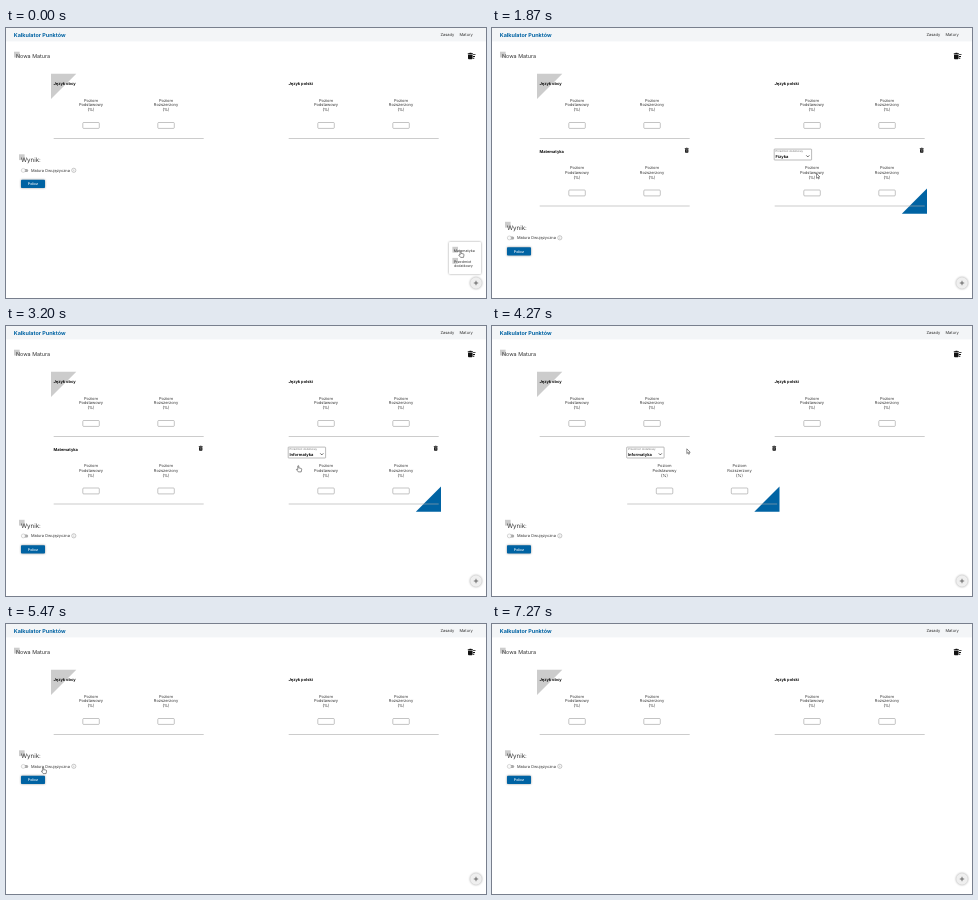
These frames come from a looping animation (480x270 px, 8.07 s). An HTML page:

```html
<!DOCTYPE html>
<html lang="pl">
<head>
<meta charset="utf-8">
<title>Kalkulator Punktów</title>
<style>
  html, body { margin: 0; width: 100%; height: 100%; overflow: hidden; background: #fff; }
  svg { display: block; width: 100vw; height: 100vh; }
  text { font: 4px Inter, "Open Sans", sans-serif; fill: #333; text-rendering: geometricPrecision; }
  .bold { font-weight: 700; fill: #111; }
  .mid { text-anchor: middle; }
  .deco { fill: #ccc; }
  .shadow { filter: drop-shadow(0 .6px 1px rgba(0, 0, 0, .4)); }
</style>
</head>
<body>
<svg id="stage" viewBox="0 0 480 270" preserveAspectRatio="none"></svg>
<script>
const LOOP = 8070, TICK = 1000 / 15;
const ROW = 67.5, COLUMN = 235, BLUE = '#0063a3';
const SUBJECTS = ['Fizyka', 'Informatyka', 'Chemia', 'Biologia', 'Geografia', 'Historia', 'WOS'];

const text = (x, y, label, cls = '', style = '') =>
  `<text x="${x}" y="${y}" class="${cls}" style="${style}">${label}</text>`;
const rect = (x, y, w, h, attrs) => `<rect x="${x}" y="${y}" width="${w}" height="${h}" ${attrs}/>`;
const group = (id, body, attrs = '') => `<g id="${id}" ${attrs}>${body}</g>`;
const deco = (x, y) => rect(x, y, 5.6, 5.8, 'class="deco"');

// Cards are drawn at the top left slot and moved into place.
function level(x, name, id) {
  return text(x, 73.5, 'Poziom', 'mid') + text(x, 78.4, name, 'mid') + text(x, 83.1, '(%)', 'mid') +
    rect(x - 8.2, 94.5, 16.5, 5.9, `id="${id}" rx=".9" fill="#fff" stroke="#888" stroke-width=".5"`);
}

function card(id, head) {
  return group(id, head +
    level(85, 'Podstawowy', id + 'Basic') + level(160, 'Rozszerzony', id + 'Extended') +
    '<path d="M47.7 110.5H197.7" stroke="#aaa" stroke-width=".6"/>');
}

const title = label => text(47.5, 57, label, 'bold');
const bin = '<path d="M192.8 52.6h1l.4-.4h1l.4.4h1v.7h-3.8zM193 53.7h3.4v2.8q0 .7-.7.7h-2q-.7 0-.7-.7z" fill="#111"/>' +
  '<path d="M194 54.7l1.4 1.5M195.4 54.7l-1.4 1.5" stroke="#fff" stroke-width=".35"/>';

const select = rect(47.2, 53.6, 37.4, 10.9, 'rx=".5" fill="#fff" stroke="#777" stroke-width=".5"') +
  text(48.5, 56.8, 'Przedmiot dodatkowy', '', 'font-size:2.7px;fill:#777') +
  '<text id="chosen" x="48.5" y="62" class="bold"></text>' +
  '<path d="M79.3 59.9l1.5 1.5 1.5-1.5" fill="none" stroke="#222" stroke-width=".7"/>';

const dropdown = rect(281, 133.5, 42, 40.5, 'rx="1" fill="#fff" class="shadow"') +
  rect(281, 134.5, 42, 5.5, 'fill="#e3edf5"') +
  SUBJECTS.map((name, i) => text(283.5, 138.7 + i * 5.5, name)).join('');

const menu = rect(443, 214, 32, 32, 'rx=".8" fill="#fff" class="shadow"') +
  deco(446.4, 218.8) + deco(446.4, 229.9) +
  text(447.8, 224, 'Matematyka', '', 'font-size:3.6px') +
  text(448, 234.7, 'Przedmiot', '', 'font-size:3.6px') +
  text(448, 239, 'dodatkowy', '', 'font-size:3.6px');

const result = deco(13, 126.3) + text(15, 134.2, 'Wynik:', '', 'font-size:6.2px') +
  rect(15.6, 140.9, 6.6, 3, 'id="track" rx="1.5"') +
  '<circle id="thumb" cy="142.4" r="2" stroke="#aaa" stroke-width=".4"/>' +
  text(25, 143.9, 'Matura Dwujęzyczna', '', 'font-size:3.93px') +
  '<circle cx="67.8" cy="142.3" r="2.1" fill="none" stroke="#777" stroke-width=".4"/>' +
  '<path d="M67.8 141.9v1.4M67.8 141v.4" stroke="#777" stroke-width=".4"/>' +
  rect(15, 151.7, 24, 8.3, `rx=".8" fill="${BLUE}" class="shadow"`) +
  text(27, 157.1, 'Policz', 'mid', 'font-size:3.6px;font-weight:500;fill:#fff');

const sweepIcon = '<path d="M461.8 25.3h1.4l.5-.5h1.5l.5.5h1.2v.9h-5.1zM462 26.7h4.6v3.6q0 .9-.9.9h-2.8q-.9 0-.9-.9z' +
  'M467 26.2h2.5v.9H467zM467 28h2v.9h-2zM467 29.8h1.3v.9H467z" fill="#111"/>';

const arrow = '<path d="M0 0V4.8L1.1 3.8 1.9 5.5 2.7 5.1 1.9 3.5H3.4Z" fill="#fff" stroke="#222" stroke-width=".5"/>';
const hand = '<path d="M-.5.4Q0-.3.5.4V2.4L2.8 2.9Q3.5 3.1 3.4 3.9L2.9 6.4H0L-1.9 4Q-1.5 3.2-.5 4Z" ' +
  'fill="#fff" stroke="#222" stroke-width=".5"/>';

document.getElementById('stage').innerHTML =
  rect(0, 0, 480, 13.4, 'fill="#f3f5f7"') +
  text(7.8, 8.9, 'Kalkulator Punktów', 'bold', `font-size:5.45px;fill:${BLUE}`) +
  text(434.5, 8.3, 'Zasady') + text(453.5, 8.3, 'Matury') +
  deco(8, 23.7) + text(10, 30.2, 'Nowa Matura', '', 'font-size:5.4px') + sweepIcon +
  '<path d="M45 45.7h25.3L45 71z" class="deco"/>' +
  card('foreign', title('Język obcy')) +
  card('polish', title('Język polski')) +
  card('maths', title('Matematyka') + bin) +
  card('extra', select + bin + `<path d="M200 93v25.2h-25.2z" fill="${BLUE}"/>`) +
  group('result', result) + group('dropdown', dropdown) + group('menu', menu) +
  '<circle cx="470" cy="255" r="5.8" fill="#efefef" class="shadow"/>' +
  '<path d="M467.8 255h4.4M470 252.8v4.4" stroke="#222" stroke-width=".6"/>' +
  group('arrow', arrow) + group('hand', hand);

const el = Object.fromEntries([...document.querySelectorAll('[id]')].map(node => [node.id, node]));
const show = (node, on) => node.setAttribute('display', on ? 'inline' : 'none');
const move = (node, x, y) => node.setAttribute('transform', `translate(${x} ${y})`);
const ramp = (t, from, to) => Math.min(1, Math.max(0, (t - from) / (to - from)));
const ease = p => p * p * (3 - 2 * p);
const within = (t, from, to) => t >= from && t < to;

// time, x, y of the pointer tip
const PATH = [
  [0, 454.6, 223], [130, 454.6, 223], [400, 470, 254], [470, 470, 254], [730, 465.2, 239.5],
  [1070, 465.2, 239.5], [1730, 324.5, 145.5], [1870, 324.5, 145.5], [2070, 302, 127],
  [2330, 302, 127], [2730, 292.3, 139.5], [3200, 292.3, 139.5], [3860, 194.8, 122.8],
  [4270, 194.8, 122.8], [4530, 281.5, 122.8], [4600, 281.5, 122.8], [4930, 85, 157],
  [5460, 37.2, 143.2], [6800, 37.2, 143.2], [7200, 331, 170]
];
const HAND_SPANS = [[0, 200], [330, 1140], [2000, 3270], [3730, 4130], [4460, 4670], [5260, 6870]];

function pointer(t) {
  const next = PATH.findIndex(key => key[0] > t);
  if (next < 0) return PATH.at(-1).slice(1);
  const [t0, x0, y0] = PATH[next - 1], [t1, x1, y1] = PATH[next];
  const p = ease(ramp(t, t0, t1));
  return [x0 + (x1 - x0) * p, y0 + (y1 - y0) * p];
}

function draw(t) {
  const maths = within(t, 260, 4130), extra = within(t, 1190, 4660);
  show(el.maths, maths);
  show(el.extra, extra);
  move(el.polish, COLUMN, 0);
  move(el.maths, 0, ROW);
  move(el.extra, maths ? COLUMN : 87.5, ROW);
  move(el.result, 0, maths || extra ? ROW : 0);
  el.chosen.textContent = SUBJECTS[t < 2930 ? 0 : 1];

  const menuOpacity = t < 440 ? 1 - ramp(t, 10, 240) : ramp(t, 440, 600) - ramp(t, 940, 1170);
  el.menu.setAttribute('opacity', menuOpacity);
  el.dropdown.setAttribute('opacity', ramp(t, 2220, 2400) - ramp(t, 2930, 3190));

  const on = ease(ramp(t, 5690, 5860)) - ease(ramp(t, 6290, 6460));
  el.thumb.setAttribute('cx', 17.3 + 3.2 * on);
  el.thumb.setAttribute('fill', on > .5 ? BLUE : '#fafafa');
  el.track.setAttribute('fill', on > .5 ? '#80b1d1' : '#aaa');
  const disabled = within(t, 5730, 6330);
  el.foreignBasic.setAttribute('fill', disabled ? '#f2f2f2' : '#fff');
  el.foreignBasic.setAttribute('stroke', disabled ? '#ccc' : '#888');

  const [x, y] = pointer(t), visible = t < 7260;
  const pointing = HAND_SPANS.some(([from, to]) => within(t, from, to));
  show(el.hand, visible && pointing);
  show(el.arrow, visible && !pointing);
  move(el.hand, x, y);
  move(el.arrow, x, y);
}

function tick() {
  const t = performance.now() % LOOP;
  draw(Math.floor((t + 3.5) / TICK) * TICK);
  requestAnimationFrame(tick);
}
tick();
</script>
</body>
</html>
```
